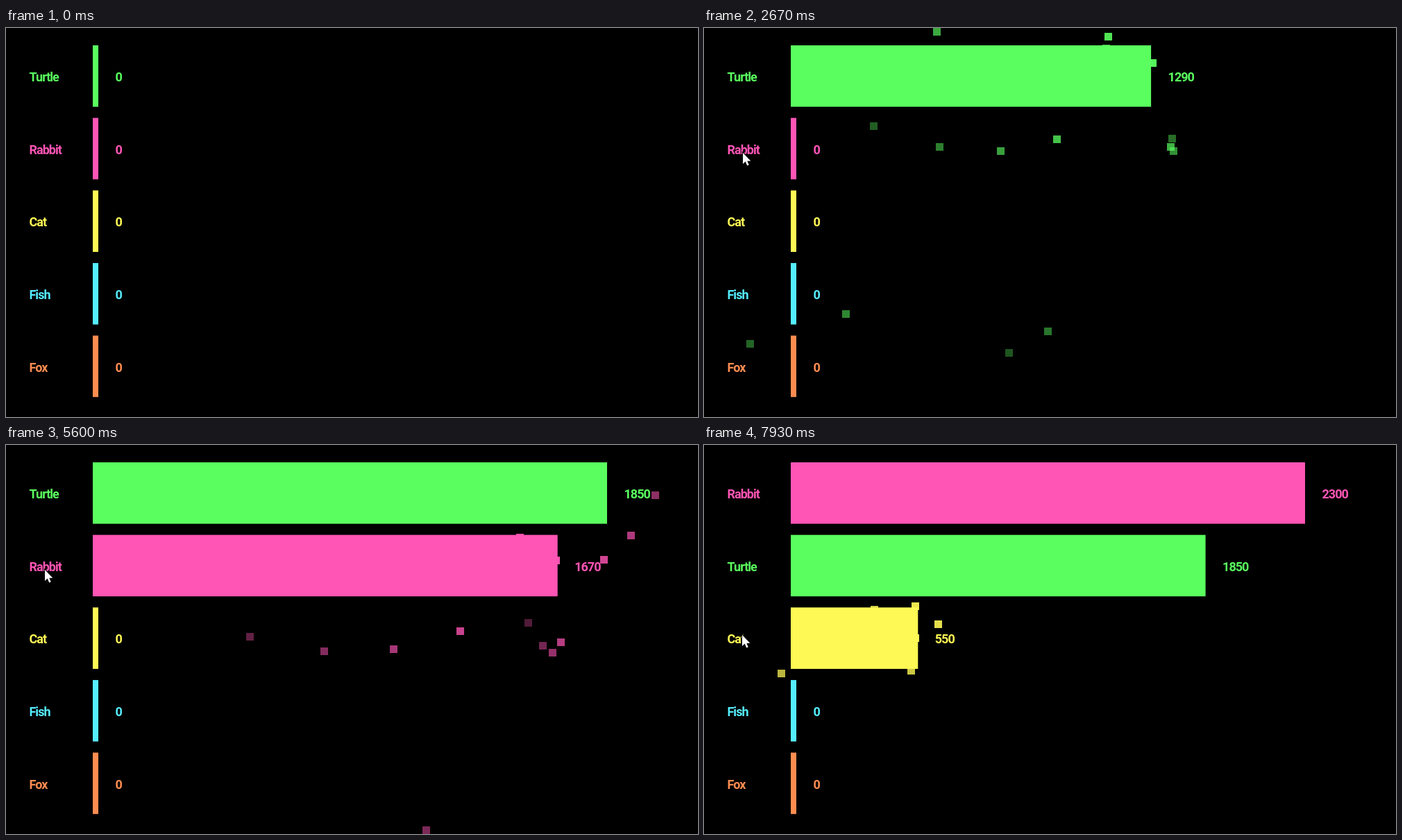
An HTML page with a canvas for the animation above (8 s loop, 997x561 px).

```html
<!DOCTYPE html>
<html lang="en">
<head>
<meta charset="utf-8">
<title>Animal race</title>
<style>
html, body { margin: 0; width: 100%; height: 100%; overflow: hidden; background: #000; }
canvas { display: block; }
</style>
</head>
<body>
<canvas id="stage" width="997" height="561"></canvas>
<script>
const ctx = document.getElementById('stage').getContext('2d');
const LOOP = 8000, STEP = 200 / 3, RATE = 0.83;
const LEFT = 125, TOP = 25, PITCH = 104.65, BAR_H = 88.6;
const MIN_W = 8, SPAN = 733, FULL = 1850;
const LIFE = 2200, SIZE = 11, GRAVITY = 600, EMIT = 73;

const animals = [
  { name: 'Turtle', color: '#5aff5f', start: 1118, total: 1850 },
  { name: 'Rabbit', color: '#ff55b5', start: 3586, total: 2300 },
  { name: 'Cat', color: '#fff955', start: 7270, total: 2300 },
  { name: 'Fish', color: '#55eeff', start: LOOP, total: 0 },
  { name: 'Fox', color: '#ff8c50', start: LOOP, total: 0 }
];

// time, x, y of the pointer's tip
const pointer = [
  [520, 70, -22], [735, 51, 69], [2250, 51, 69], [2550, 56, 180],
  [6600, 56, 180], [6800, 61, 253], [6950, 51, 277], [7850, 51, 277], [7930, 55, 274]
];

// Evenly scattered value between min and max
function scatter(n, ratio, min, max) {
  return min + (max - min) * ((0.5 + n * ratio) % 1);
}

function count(animal, t) {
  const points = Math.max(0, t - animal.start) * RATE;
  return Math.min(animal.total, Math.round(points / 10) * 10);
}

// Ranked bars at time t
function layout(t) {
  const bars = animals.map(animal => ({ animal, value: count(animal, t) }));
  bars.sort((a, b) => b.value - a.value);
  const scale = SPAN / Math.max(FULL, bars[0].value);
  bars.forEach((bar, i) => {
    bar.y = TOP + i * PITCH;
    bar.w = MIN_W + bar.value * scale;
  });
  return bars;
}

const sparks = [];
for (const animal of animals) {
  const end = Math.min(LOOP, animal.start + animal.total / RATE);
  for (let born = animal.start + 78; born < end; born += EMIT) {
    const bar = layout(born).find(b => b.animal === animal);
    const n = sparks.length;
    sparks.push({
      born, color: animal.color,
      x: LEFT + bar.w - 4, y: bar.y + BAR_H / 2,
      vx: scatter(n, 0.7549, -110, 500), vy: scatter(n, 0.5698, -400, 60)
    });
  }
}

function drawSparks(t) {
  for (const s of sparks) {
    const age = t - s.born, sec = age / 1000;
    if (age < 0 || age > LIFE) continue;
    const x = s.x + s.vx * sec;
    const y = s.y + s.vy * sec + GRAVITY / 2 * sec * sec;
    ctx.globalAlpha = 1 - age / LIFE;
    ctx.fillStyle = s.color;
    ctx.fillRect(Math.round(x - SIZE / 2), Math.round(y - SIZE / 2), SIZE, SIZE);
  }
  ctx.globalAlpha = 1;
}

function drawBars(t) {
  ctx.font = 'bold 18px Roboto, "Open Sans", sans-serif';
  ctx.letterSpacing = '-1px';
  for (const { animal, value, y, w } of layout(t)) {
    ctx.fillStyle = animal.color;
    ctx.fillRect(LEFT, y, w, BAR_H);
    ctx.fillText(animal.name, 33.5, y + 52);
    ctx.fillText(value, LEFT + w + 24.5, y + 52);
  }
}

const arrow = new Path2D('M0 0V16L3.7 12.6L6.2 18.4L8.7 17.3L6.3 11.8H11.3Z');
function drawPointer(t) {
  if (t < pointer[0][0]) return;
  let i = pointer.length - 1;
  while (pointer[i][0] > t) i--;
  const a = pointer[i], b = pointer[i + 1] || a;
  const k = a === b ? 0 : (t - a[0]) / (b[0] - a[0]);
  ctx.save();
  ctx.translate(a[1] + (b[1] - a[1]) * k, a[2] + (b[2] - a[2]) * k);
  ctx.strokeStyle = '#000';
  ctx.lineWidth = 2;
  ctx.stroke(arrow);
  ctx.fillStyle = '#fff';
  ctx.fill(arrow);
  ctx.restore();
}

function draw(now) {
  // The picture advances 15 times a second
  const t = Math.floor(now % LOOP / STEP + 0.06) * STEP;
  ctx.fillStyle = '#000';
  ctx.fillRect(0, 0, 997, 561);
  drawSparks(t);
  drawBars(t);
  drawPointer(t);
  requestAnimationFrame(draw);
}
requestAnimationFrame(draw);
</script>
</body>
</html>
```
